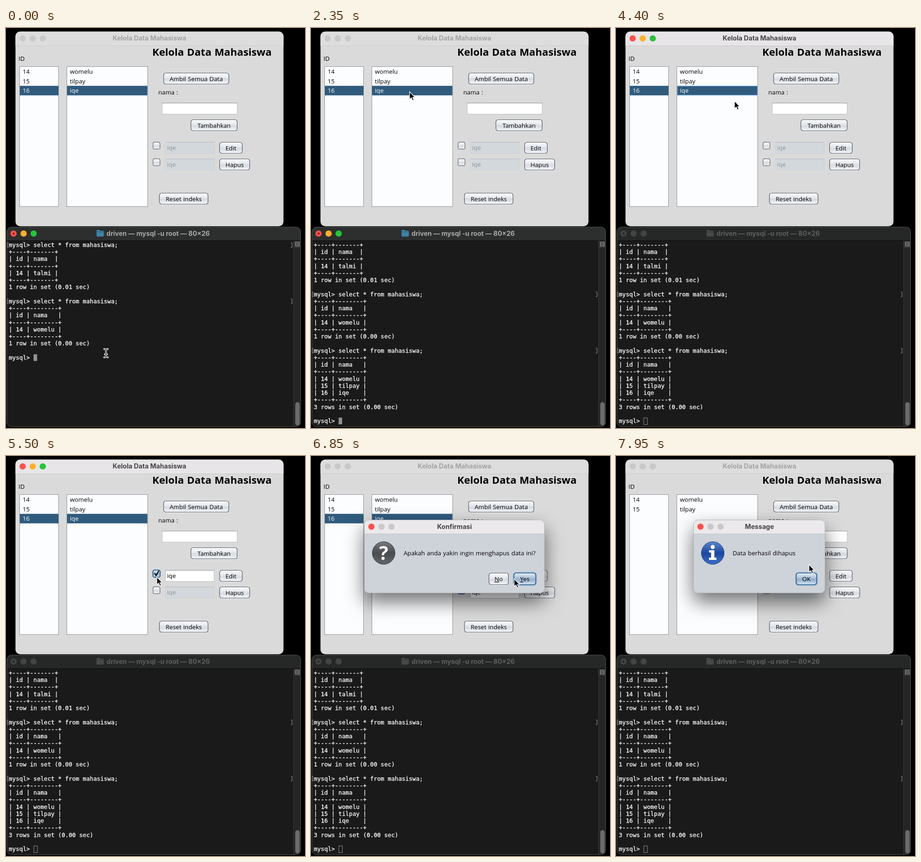
An HTML page for the animation above (8 s loop, 646 by 866 pixels).

```html
<!DOCTYPE html>
<html lang="id">
<head>
<meta charset="utf-8">
<title>Kelola Data Mahasiswa</title>
<style>
html, body { margin: 0; width: 100%; height: 100%; overflow: hidden; background: #000; }
svg { display: block; width: 646px; height: 866px; font: 500 13.2px "Open Sans", sans-serif; word-spacing: .056em; }
text { white-space: pre; }
.mid { text-anchor: middle; }
.head { font-size: 22.2px; font-weight: 700; }
.sign { font-size: 41px; font-weight: 700; }
.bar { font: 700 14.1px Inter, sans-serif; word-spacing: 0; }
.mono { font: 12.65px "DejaVu Sans Mono", monospace; word-spacing: 0; fill: #fff; stroke: #fff; stroke-width: .3px; }
.mark { fill: none; stroke: #a0a0a0; }
.dialog { filter: drop-shadow(0 19px 20px rgba(0, 0, 0, .55)); }
</style>
</head>
<body>
<svg id="stage" viewBox="0 0 646 866">
<defs>
  <linearGradient id="btn" x2="0" y2="1">
    <stop stop-color="#fbfcfd"/><stop offset=".45" stop-color="#e3e6eb"/>
    <stop offset=".55" stop-color="#d6dae1"/><stop offset="1" stop-color="#f3f5f8"/>
  </linearGradient>
  <linearGradient id="blue" x2="0" y2="1">
    <stop stop-color="#e4edf7"/><stop offset=".45" stop-color="#a9bfd6"/>
    <stop offset=".55" stop-color="#92aecb"/><stop offset="1" stop-color="#cfe2f4"/>
  </linearGradient>
  <linearGradient id="gray" x2="0" y2="1">
    <stop stop-color="#777a7d"/><stop offset=".5" stop-color="#4a4d50"/><stop offset="1" stop-color="#64676a"/>
  </linearGradient>
  <linearGradient id="info" x2="0" y2="1">
    <stop stop-color="#5e86ca"/><stop offset=".5" stop-color="#1d479f"/><stop offset="1" stop-color="#3d6fc4"/>
  </linearGradient>
</defs>
</svg>
<script>
const LOOP = 8000, ROW = 15.24, CHAR = 7.617;
const T = { command: 300, run: 550, focus: 2450, check1: 4950, uncheck1: 5600, check2: 5800,
  ask: 6450, answer: 7600, done: 7700 };
const people = ["womelu", "tilpay", "iqe"];
const stage = document.getElementById("stage");

function add(parent, tag, attrs = {}, text) {
  const node = document.createElementNS("http://www.w3.org/2000/svg", tag);
  for (const key in attrs) node.setAttribute(key, attrs[key]);
  if (text !== undefined) node.textContent = text;
  parent.append(node);
  return node;
}
const group = parent => add(parent, "g");
const rect = (parent, x, y, width, height, fill, more) =>
  add(parent, "rect", { x, y, width, height, fill, ...more });
const label = (parent, x, y, text, more) => add(parent, "text", { x, y, ...more }, text);
const path = (parent, d, more) => add(parent, "path", { d, fill: "none", ...more });
const show = (node, on) => node.setAttribute("visibility", on ? "inherit" : "hidden");

function button(parent, x, y, w, h, text, focused) {
  rect(parent, x + .5, y + 1.5, w - 1, h - 1, "none", { rx: 5, stroke: "#f4f5f7" });
  if (focused) rect(parent, x - .5, y - .5, w + 1, h + 1, "none", { rx: 6, stroke: "#6ea2d3", "stroke-width": 2 });
  rect(parent, x + .5, y + .5, w - 1, h - 1, focused ? "url(#blue)" : "url(#btn)",
    { rx: 5, stroke: focused ? "#24496d" : "#555b64", "stroke-width": 1.2 });
  return label(parent, x + w / 2, y + h / 2 + 5, text, { class: "mid" });
}

function field(parent, x, y, w, h, on) {
  rect(parent, x + .5, y + .5, w - 1, h - 1, on ? "#fff" : "#d3d8dd", { stroke: on ? "#b9bdc2" : "#cdd1d6" });
  path(parent, `M${x} ${y + .5}h${w}`, { stroke: on ? "#8b8f95" : "#b5bac0" });
}

function lights(parent, x, y, colors) {
  colors.forEach((fill, i) => add(parent, "circle", { cx: x + i * 21.7, cy: y, r: 6.8, fill }));
}
const vivid = ["#fc514b", "#fdb02b", "#2bc23c"];
const dull = Array(3).fill("#c9c9c9");

function switchBox(parent, y) {
  const off = group(parent), on = group(parent);
  rect(off, 317.7, y + .2, 15, 15, "url(#btn)", { rx: 3.5, stroke: "#646a72", "stroke-width": 1.2 });
  field(off, 344, y, 106, 25, false);
  const name = label(off, 348, y + 17, people[2], { fill: "#8d9399" });
  rect(on, 317, y - .5, 16.4, 16.4, "none", { rx: 4.5, stroke: "#6ea2d3", "stroke-width": 2 });
  rect(on, 317.7, y + .2, 15, 15, "url(#blue)", { rx: 3.5, stroke: "#24496d", "stroke-width": 1.2 });
  path(on, `M321 ${y + 6.5}l3.3 5.3 6-10.3`, { stroke: "#000", "stroke-width": 2.3 });
  field(on, 344, y, 106, 25, true);
  label(on, 348, y + 17, people[2]);
  return { name, set(v) { show(off, !v); show(on, v); } };
}

function dialog(x, w, title, icon, text) {
  const g = group(stage), cx = x + 42;
  rect(g, x, 138, w, 159, "#ced2d9", { rx: 10, class: "dialog" });
  path(g, `M${x} 168.5V148a10 10 0 0 1 10-10h${w - 20}a10 10 0 0 1 10 10v20.5z`, { fill: "#ebe9eb" });
  path(g, `M${x} 168.5h${w}`, { stroke: "#c6c6c9" });
  rect(g, x + .5, 138.5, w - 1, 158, "none", { rx: 10, stroke: "#a8a9ac", "stroke-width": .8 });
  lights(g, x + 15.5, 153, [vivid[0], ...dull.slice(1)]);
  label(g, 310, 158, title, { class: "bar mid", fill: "#454545" });
  add(g, "circle", { cx, cy: 210, r: 24.5, fill: `url(#${icon})`, stroke: icon === "gray" ? "#34373a" : "#173b86" });
  if (icon === "gray") {
    label(g, cx, 225, "?", { class: "mid sign", fill: "#fff" });
  } else {
    add(g, "circle", { cx, cy: 197, r: 4.5, fill: "#fff" });
    path(g, `M${cx - 8} 204h11.500v16h4.500v5h-16v-5h4.500v-11h-4.500z`, { fill: "#fff" });
  }
  label(g, x + 85, 214.5, text);
  return g;
}

// Form window
const form = group(stage);
rect(form, 20.5, 7.7, 579, 421.5, "#dadada", { rx: 10 });
const frontBar = group(form), backBar = group(form);
[[frontBar, "#e7e5e7", "#454545", vivid], [backBar, "#dddddd", "#a3a3a3", dull]]
  .forEach(([g, fill, ink, colors]) => {
    path(g, "M20.5 38.5V17.700a10 10 0 0 1 10-10h559a10 10 0 0 1 10 10v20.800z", { fill });
    path(g, "M20.5 38.5h579", { stroke: "#cbcbcb" });
    lights(g, 36, 22.5, colors);
    label(g, 310, 27.3, "Kelola Data Mahasiswa", { class: "bar mid", fill: ink });
  });
label(form, 316, 60, "Kelola Data Mahasiswa", { class: "head" });
label(form, 27, 71, "ID");
rect(form, 29.5, 83.5, 84, 303, "#fcfdff", { stroke: "#8d9197" });
rect(form, 131.5, 83.5, 174.5, 303, "#fcfdff", { stroke: "#8d9197" });
const picked = group(form);
rect(picked, 30, 125.2, 83.5, 20.6, "#305b7d");
rect(picked, 132, 125.2, 173.5, 20.6, "#305b7d");
const ring = rect(picked, 132.5, 125.7, 173, 19.6, "none", { stroke: "#73a4d1", "stroke-width": 1.3 });
people.forEach((name, i) => {
  const g = i === 2 ? picked : form, y = 99 + i * 20.5, fill = i === 2 ? "#fff" : "#000";
  label(g, 36, y, 14 + i, { fill });
  label(g, 138, y, name, { fill });
});
button(form, 340, 97, 142, 25, "Ambil Semua Data");
label(form, 329, 143.5, "nama :");
field(form, 337, 162, 163, 25, true);
button(form, 399, 198, 101, 25, "Tambahkan");
const editBox = switchBox(form, 247), dropBox = switchBox(form, 283);
button(form, 461, 247, 50, 25, "Edit");
button(form, 461, 283, 66, 25, "Hapus");
button(form, 331, 357, 106, 25, "Reset indeks");

// Terminal window
const term = group(stage);
rect(term, 2, 431, 634.5, 432, "#1a1a1a", { rx: 10 });
const liveBar = group(term), idleBar = group(term);
[[liveBar, "#2d2e2e", "#a9aaaa", vivid, "#3d83a9"], [idleBar, "#262727", "#5d5e5e", Array(3).fill("#424343"), "#474848"]]
  .forEach(([g, fill, ink, colors, folder]) => {
    path(g, "M2 460.5V441a10 10 0 0 1 10-10h614.5a10 10 0 0 1 10 10v19.5z", { fill });
    lights(g, 16.3, 445, colors);
    if (g === liveBar) add(g, "circle", { cx: 16.3, cy: 445, r: 2.1, fill: "#7d0d0a" });
    else path(g, "M13.5 445h5.6M16.3 442.2v5.6", { stroke: "#202020", "stroke-width": 1.6 });
    path(g, "M195.5 439q0-2 2-2h4l2 2h6q2 0 2 2v8.5q0 2-2 2h-12q-2 0-2-2z", { fill: folder });
    path(g, "M195.5 441.5h16", { stroke: fill, "stroke-opacity": .5 });
    label(g, 217, 449.5, "driven — mysql -u root — 80×26", { class: "bar", fill: ink });
  });
path(term, "M2 460.5h634.5", { stroke: "#090909" });
path(term, "M621 461h15.5v392a10 10 0 0 1-10 10h-5.5z", { fill: "#252525" });
path(term, "M621.5 461v402", { stroke: "#3b3b3b" });
rect(term, 622, 461, 14.5, 15, "#343434");
path(term, "M625.5 463.5h8v9h-8zM625.5 466.5h8M625.5 469.5h8", { stroke: "#a5a5a5", "stroke-width": .9 });
rect(term, 625, 810, 9.5, 50.5, "#6b6b6b", { rx: 4.7 });
rect(term, 2, 431, 634.5, 432, "none", { rx: 10, stroke: "#595959" });

function table(rows, w) {
  const line = `+----+${"-".repeat(w + 2)}+`;
  const cells = ([id, name]) => `| ${id} | ${name.padEnd(w)} |`;
  return [line, cells(["id", "nama"]), line, ...rows.map(cells), line];
}
const prompt = "mysql> ", command = prompt + "select * from mahasiswa;";
const log = [
  command, ...table([[14, "talmi"]], 5), "1 row in set (0.01 sec)", "",
  command, ...table([[14, people[0]]], 6), "1 row in set (0.00 sec)", "",
  command, ...table(people.map((name, i) => [14 + i, name]), 6), "3 rows in set (0.00 sec)", "",
  prompt
];
const screen = group(term);
const lines = log.map((text, i) => {
  const g = group(screen), y = 474 + i * ROW;
  const node = label(g, 6, y, text, { class: "mono" });
  const marks = path(g, `M5.5 ${y - 9}h-2.5v10h2.5M615.5 ${y - 9}h2.5v10h-2.5`, { class: "mark" });
  show(marks, text === command);
  return { g, node, marks };
});
const caret = rect(screen, 0, 0, CHAR, 14.5, "#929292");

// Dialogs
const ask = dialog(115, 390, "Konfirmasi", "gray", "Apakah anda yakin ingin menghapus data ini?");
[["No", 384, 43], ["Yes", 438, 48]].forEach(([text, x, w]) => {
  const t = button(ask, x, 253, w, 26, "", text === "Yes");
  add(t, "tspan", { "text-decoration": "underline" }, text[0]);
  add(t, "tspan", {}, text.slice(1));
});
const done = dialog(167, 285, "Message", "info", "Data berhasil dihapus");
button(done, 389, 253, 45, 26, "OK", true);

// Pointer
const pointer = group(stage);
const arrow = path(pointer, "M0 0V16.5L3.8 13 6.4 19 9.2 17.8 6.7 12H11.5z",
  { fill: "#000", stroke: "#fff", "stroke-width": 1.2 });
const beam = group(pointer);
const beamPath = "M-4-9Q0-9 0-6V6Q0 9-4 9M4-9Q0-9 0-6M0 6Q0 9 4 9M-2.5 2.5h5";
path(beam, beamPath, { stroke: "#fff", "stroke-width": 3.4, "stroke-linecap": "round" });
path(beam, beamPath, { stroke: "#111", "stroke-width": 1.2 });

const route = [
  [0, 216, 704], [950, 216, 704], [1650, 218, 150], [2350, 213, 138], [2700, 213, 138],
  [3350, 160, 130], [3550, 160, 130], [4350, 256, 158], [4500, 256, 158], [4900, 325, 257],
  [5450, 326, 262], [5600, 326, 262], [5780, 326, 292], [5950, 326, 292], [6300, 488, 297],
  [6480, 488, 297], [6800, 439, 266], [7600, 441, 265], [7900, 417, 235], [LOOP, 417, 235]
];
function locate(t) {
  const i = route.findIndex(p => p[0] > t);
  const [t0, x0, y0] = route[i - 1], [t1, x1, y1] = route[i];
  const k = (t - t0) / (t1 - t0), e = k * k * (3 - 2 * k);
  return [x0 + (x1 - x0) * e, y0 + (y1 - y0) * e];
}

function render(t) {
  const live = t < T.focus, ran = t >= T.run, typed = t >= T.command;
  const editing = t >= T.check1 && t < T.uncheck1, removed = t >= T.done;
  const last = ran ? 26 : 16;

  show(frontBar, !live && t < T.ask);
  show(backBar, live || t >= T.ask);
  show(liveBar, live);
  show(idleBar, !live);

  lines.forEach(({ g }, i) => show(g, i <= last && (i > 0 || !ran)));
  lines[16].node.textContent = typed ? command : prompt;
  show(lines[16].marks, ran);
  screen.setAttribute("transform", `translate(0 ${ran ? -ROW : 0})`);
  const column = typed && !ran ? command.length : prompt.length;
  const inset = live ? 0 : .5;
  caret.setAttribute("x", 6.3 + column * CHAR + inset);
  caret.setAttribute("y", 462.5 + last * ROW + inset);
  caret.setAttribute("fill", live ? "#929292" : "none");
  caret.setAttribute("stroke", live ? "none" : "#929292");

  show(picked, !removed);
  show(ring, !live && t < T.check1);
  editBox.set(editing);
  dropBox.set(t >= T.check2 && !removed);
  show(editBox.name, !removed && !editing);
  show(dropBox.name, t < T.check2);
  show(ask, t >= T.ask && t < T.answer);
  show(done, removed);

  const [x, y] = locate(t);
  pointer.setAttribute("transform", `translate(${x.toFixed(2)} ${y.toFixed(2)})`);
  show(beam, y > 461);
  show(arrow, y <= 461);
}

function tick() {
  render(performance.now() % LOOP);
  requestAnimationFrame(tick);
}
tick();
</script>
</body>
</html>
```
